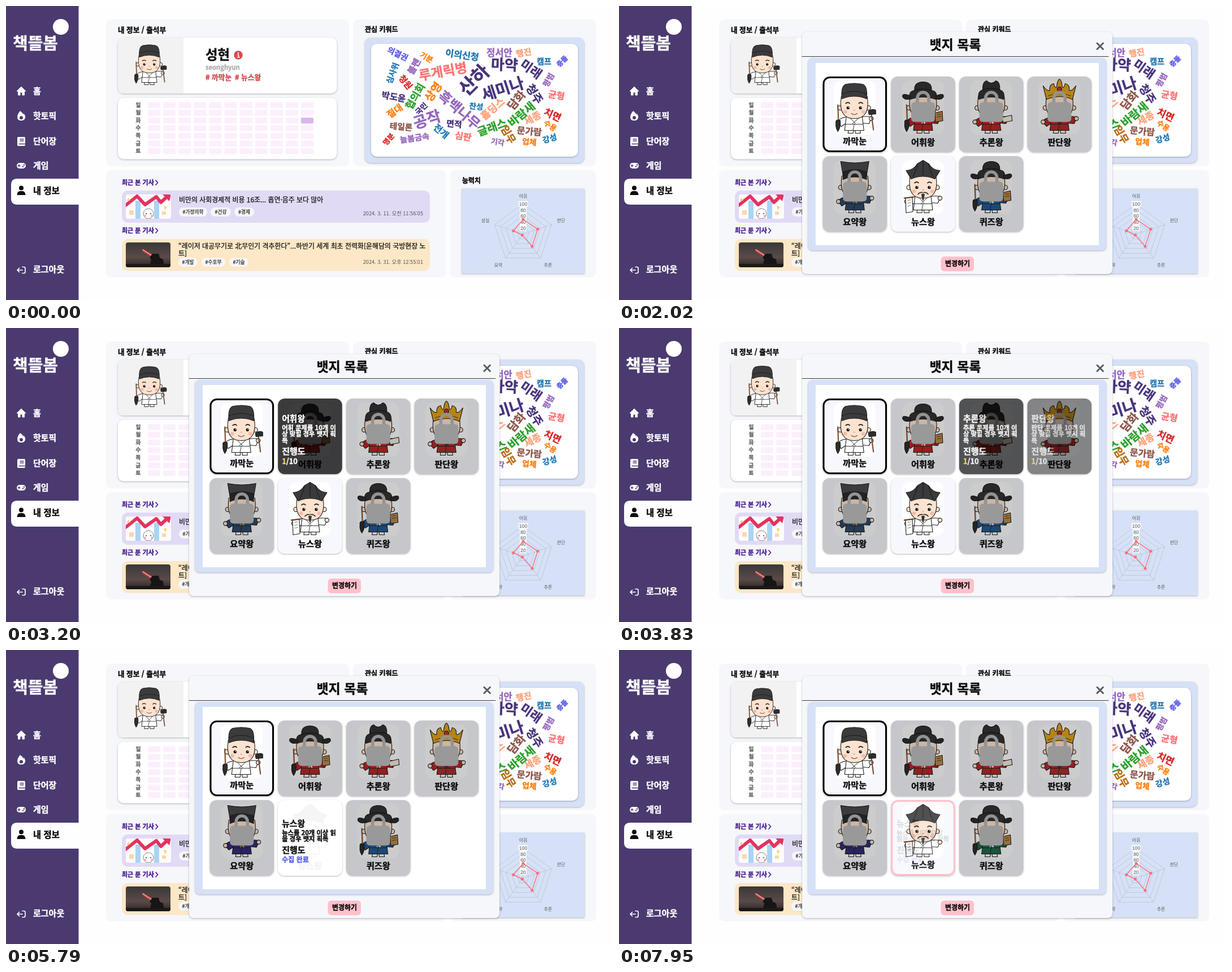
Animation of 1074 by 521 pixels, one loop 8000 ms. Source, as an HTML page:

```html
<!DOCTYPE html>
<html lang="ko">
<head>
<meta charset="utf-8">
<style>
html, body { margin: 0; width: 100%; height: 100%; overflow: hidden; background: #fefefe; }
svg { display: block; width: 1074px; height: 521px; }
text { font-family: "Noto Sans CJK KR", "Noto Sans CJK", "Noto Sans", sans-serif; font-weight: 900; stroke-width: .4px; white-space: pre; }
.mid { font-weight: 500; stroke-width: .25px; }
.thin { font-weight: 400; stroke-width: 0; }
.num { font-family: "Liberation Sans", sans-serif; font-weight: 400; stroke-width: 0; }
.sh { filter: drop-shadow(0 1px 1.5px rgba(0,0,0,.28)); }
</style>
</head>
<body>
<svg id="stage" viewBox="0 0 1074 521" xmlns="http://www.w3.org/2000/svg"></svg>
<script>
const LOOP = 8000, FADE = 300, OPEN = 1900, PICK = 7100;
const PANEL = '#f6f7fb', BLUE = '#d6e1f7', PINK = '#ffc0cb';

// --- drawing helpers ---
const text = (x, y, size, str, fill = '#0c0c0c', extra = '') =>
  `<text x="${x}" y="${(y + size * .36).toFixed(1)}" font-size="${size}" fill="${fill}" stroke="${fill}" ${extra}>${str}</text>`;
const mid = 'text-anchor="middle"';
const rect = (x, y, x2, y2, r, fill, extra = '') =>
  `<rect x="${x}" y="${y}" width="${x2 - x}" height="${y2 - y}" rx="${r}" fill="${fill}" ${extra}/>`;
const path = (d, fill = 'none', extra = '') => `<path d="${d}" fill="${fill}" ${extra}/>`;
const dot = (x, y, r, fill, extra = '') => `<circle cx="${x}" cy="${y}" r="${r}" fill="${fill}" ${extra}/>`;
const group = (x, y, body, extra = '') => `<g transform="translate(${x} ${y})" ${extra}>${body}</g>`;
const line = (d, color, w = 1, extra = '') => path(d, 'none', `stroke="${color}" stroke-width="${w}" stroke-linecap="round" stroke-linejoin="round" ${extra}`);

// --- scholars, hat top at y 0, feet at y 88 ---
const INK = 'stroke="#1c1c1c" stroke-width="1.1" stroke-linejoin="round"';
const hats = {
  cap: path('M-22 27 Q-24 3 -14 1 Q0 -2 14 1 Q24 3 22 27 Q0 18 -22 27z', '#3b3b3d', INK) + line('M-21 18 Q0 9 21 18', '#1c1c1c'),
  wing: path('M-23 28 Q-27 14 -15 12 Q-16 -3 0 -3 Q16 -3 15 12 Q27 14 23 28 Q0 20 -23 28z', '#333335', INK) +
    path('M-22 22 Q-38 15 -36 24 Q-32 30 -22 27zM22 22 Q38 15 36 24 Q32 30 22 27z', '#2c2c2e', INK) + line('M-15 12 Q0 7 15 12', '#111'),
  peak: path('M-22 28 Q-25 14 -15 11 Q-16 -3 -8 -5 Q0 3 8 -5 Q16 -3 15 11 Q25 14 22 28 Q0 20 -22 28z', '#333335', INK) + line('M-15 11 Q0 6 15 11', '#111'),
  crown: path('M-23 28 L-29 4 Q-22 14 -17 12 Q-19 2 -10 0 Q-8 9 -5 6 Q-4 -6 0 -8 Q4 -6 5 6 Q8 9 10 0 Q19 2 17 12 Q22 14 29 4 L23 28 Q0 18 -23 28z', '#e3a51c', INK) +
    dot(0, 10, 4, '#c93232', INK) + line('M-20 22 Q0 13 20 22', '#8a5a08', 1.5),
  tall: path('M-20 27 L-25 -3 Q0 2 25 -3 L20 27 Q0 19 -20 27z', '#4a4a4e', INK) + path('M-21 29 L-20 15 Q0 8 20 15 L21 29 Q0 20 -21 29z', '#2c2c30', INK),
  horn: path('M-21 28 L-30 13 Q-17 13 -10 1 L0 -5 L10 1 Q17 13 30 13 L21 28 Q0 19 -21 28z', '#3a3a3c', INK) + line('M0 -5 L0 21 M-10 1 Q-12 14 -18 24 M10 1 Q12 14 18 24', '#161616')
};
const props = {
  brush: line('M-29 38 L-28 66', '#8d5a3a', 2.4) + path('M-31 65 L-25 65 Q-23 76 -29 85 Q-35 76 -31 65z', '#2d2d30', INK),
  tool: line('M30 52 L34 82', '#7a5140', 2.2) + path('M25 49 Q31 44 38 47 L38 54 L26 55z', '#2d2d30', INK),
  book: path('M21 52 L34 49 L35 66 L22 68z', '#b98a4e', INK) + line('M25 55 L31 54 M25 59 L32 58', '#5a3a16'),
  note: path('M19 60 L36 56 L37 66 L21 69z', '#f3ecd9', INK),
  scroll: path('M-31 62 L-19 60 L-18 86 L-30 88z', '#fff', INK) + line('M-27 66 L-22 65 M-27 71 L-22 70 M-27 76 L-22 75', '#777') + line('M-33 62 L-17 60', '#6b4528', 2.4)
};
function scholar({ robe, hat, hold = [], beard, trim = '#fff', id = '' }) {
  const skin = '#fde3cf';
  return `<g>` +
    path('M-10 80 L-11 88 L-2 88 L-1 80zM10 80 L11 88 L2 88 L1 80z', '#f5f5f5', INK) +
    `<g ${id && `id="${id}"`} fill="${robe}">` +
    `<path d="M-13 59 Q-27 61 -30 68 L-23 76 L-14 70z M13 59 Q27 57 31 60 L26 71 L14 70z" ${INK}/>` +
    `<path d="M-14 58 L14 58 L17 83 L-17 83z" ${INK}/></g>` +
    line('M-7 60 L3 70 M8 60 L-2 70', trim, 2.5) + line('M-8 60 L2 71 M9 60 L-4 72 M-15 72 L15 72 M0 72 L-2 82', '#222', .9) +
    dot(-29, 68, 3.6, skin, INK) + dot(30, 62, 3.6, skin, INK) + hold.map(k => props[k]).join('') +
    dot(-25, 43, 4, skin, INK) + dot(25, 43, 4, skin, INK) +
    path('M-23 23 Q-29 62 0 62 Q29 62 23 23 Q0 12 -23 23z', skin, INK) + hats[hat] +
    dot(-11, 43, 2.7, '#171717') + dot(11, 43, 2.7, '#171717') + dot(-10, 42, .8, '#fff') + dot(12, 42, .8, '#fff') +
    line('M-15 35 Q-11 32 -8 35 M8 35 Q11 32 15 35', '#222', 1.7) +
    dot(-16, 50, 3.3, '#f9b9a6') + dot(16, 50, 3.3, '#f9b9a6') +
    line('M-1 47 Q0 48.500 1 47', '#a66') + (beard
      ? path('M-3 55 Q0 53 3 55 L1 66 L-1 66z', '#333') + line('M-1 52 Q-6 51 -9 55 M1 52 Q6 51 9 55', '#333', 1.7)
      : line('M-5 53 Q0 57 5 53', '#7b3a2d', 1.2)) + `</g>`;
}
const novice = scholar({ robe: '#fff', hat: 'cap', hold: ['brush', 'tool'] });

// --- sidebar ---
function sidebar() {
  const icon = (y, body) => group(27, y, body);
  const W = '#fff', B = '#4a3a70';
  const items = [[151, '홈'], [195, '핫토픽'], [240, '단어장'], [283, '게임'], [467, '로그아웃']];
  return rect(0, 0, 128.5, 521, 0, B) + path('M129 306 H20 Q9 306 9 317 V341 Q9 352 20 352 H129z', '#fefefe') +
    dot(97, 37, 14, W) + text(12, 67, 29, '책뜰봄', W) +
    items.map(([y, s]) => text(48, y, 15, s, W)).join('') + text(48, 327, 15.4, '내 정보') +
    icon(151, path('M0 -8 L8 0 H5.500 V7 H2 V2 H-2 V7 H-5.500 V0 H-8z', W, 'stroke="#fff" stroke-linejoin="round"')) +
    icon(195, path('M-2 -9 Q4 -5 3 -2 Q4 -3 4 -5 Q8 0 7 3 Q6 8 0 8 Q-7 8 -7 2 Q-7 -3 -2 -9z', W) + dot(0, 3, 3, B)) +
    icon(240, rect(-7, -8, 7, 8, 2, W) + line('M-4 4.500 H7 M-2 -4 H4 M-2 -1 H4', B, 1.4)) +
    icon(283, rect(-8, -5, 8, 5, 5, W) + line('M-6 0 H-2 M-4 -2 V2', B, 1.3) + dot(3, 1.5, 1.2, B) + dot(5, -1.5, 1.2, B)) +
    icon(327, dot(0, -4.5, 4, '#0c0c0c') + path('M-7.500 8 Q-7 1 -2 1 H2 Q7 1 7.500 8z', '#0c0c0c')) +
    icon(468, line('M2 -5.500 H4.500 Q7 -5.500 7 -3 V3 Q7 5.500 4.500 5.500 H2 M2 0 H-7 M-3.500 -3.500 L-7 0 L-3.500 3.500', W, 1.7));
}

// --- profile and attendance ---
function profile() {
  let s = rect(177, 24, 607, 284, 9, PANEL) + text(198, 42, 12.6, '내 정보 / 출석부') +
    rect(198, 56, 585.5, 155, 10, '#fff', 'class="sh"') + path('M314 56 H208 Q198 56 198 66 V145 Q198 155 208 155 H314z', '#f2f2f2') +
    `<g id="avatar">${novice}</g>` + text(353, 87, 23.4, '성현') +
    dot(411, 87, 7.7, '#d64a4c') + dot(411, 83.5, 1.3, '#fff') + line('M410 86.500 H411.500 V90.500 M409.500 90.800 H413', '#fff', 1.6) +
    text(353, 108.5, 11.2, 'seonghyun', '#adadad') +
    text(353, 126, 12.7, '# 까막눈', '#d4474c') + text(405, 126, 12.7, '# 뉴스왕', '#d4474c') +
    rect(198, 162.5, 585.5, 271.5, 10, '#fff', 'class="sh"');
  [...'일월화수목금토'].forEach((day, r) => {
    const y = 170.5 + r * 13.6;
    s += text(234, y + 4.5, 9.6, day, '#6a6a6a', mid);
    for (let c = 0; c < 11; c++) {
      const x = 251 + c * 27.1;
      s += rect(x, y, x + 22, y + 10.5, 2, r == 2 && c == 10 ? '#dab6ec' : '#fceffd');
    }
  });
  return s;
}

// --- word cloud: "word x y size angle" per colour ---
const cloud = (color, list) => list.split(',').map(w => {
  const [str, x, y, size, a] = w.trim().split(' ');
  return group(x, y, text(0, 0, +size, str, color, `${mid} transform="rotate(${a})"`));
}).join('');
function keywords() {
  return rect(614, 24, 1044, 284, 9, PANEL) + text(635, 42, 12, '관심 키워드') +
    rect(635, 56, 1023, 278, 10, BLUE, 'class="sh"') + rect(646, 67, 1012, 267, 10, '#fff', 'class="sh"') +
    cloud('#47337c', '산하 828 131 33 -45, 마약 882 104 26 2, 미래 929 112 22 35, 세미나 879 147 28 -18, 청주 935 156 20 58, 박도윤 686 161 15.6 10, 국민 735 182 13 -45, 면적 793 209 15 5') +
    cloud('#9467bd', '정서안 873 83 16.5 0, 볼펜 722 107 16 -60, 흑백나무 802 184 24 41, 공작 745 201 27 -18, 평범 960 131 14 -60, 늘봄금속 723 234 14.2 -8, 기각 870 241 13 8') +
    cloud('#1f77b4', '이의신청 807 87 16.2 8, 캠프 952 98 14 0, 심사위 684 119 14 -70, 찬성 832 178 13.5 5, 전개 770 222 16 40, 강성 962 235 14 -15') +
    cloud('#ff7f0e', '기분 744 91 13 30, 상영 756 152 20 -55, 절대 688 186 16 -35, 수용 963 212 13 35, 업체 926 241 14 5') +
    cloud('#ff7373', '루게릭병 773 116 23.5 -10, 균형 974 158 16 10, 심판 809 231 16 10') +
    cloud('#ffa07a', '행진 916 83 15 -10, 홀딩스 861 182 18 -40, 세종 932 199 17 -30') +
    cloud('#2ca02c', '협의회 724 160 18 -60, 바람새 912 192 20 -40, 글래스 860 215 19.5 -20') +
    cloud('#d62728', '청원 707 135 15 50, 치면 967 193 17 25, 명분 677 236 12.5 -50') +
    cloud('#8c564b', '담화 903 167 20 -50, 테일론 699 214 14.5 5, 문가람 926 222 16 5') +
    cloud('#5b5bea', '의결권 693 85 14 25, 충돌 984 98 12 -45') + cloud('#b8690f', '임무 889 228 18 60');
}

// --- recent articles ---
function articles() {
  const head = (y, s) => text(205, y, 11, s, '#4b2090') + line(`M265 ${y - 4} L268.500 ${y} L265 ${y + 4}`, '#4b2090', 1.7);
  const tag = (x, y, w, s) => rect(x, y, x + w, y + 16, 8, '#f7f6f9') + text(x + w / 2, y + 8, 8.7, s, '#333', `${mid} class="mid"`);
  const date = (y, s) => text(738, y, 9.2, s, '#555', 'text-anchor="end" class="thin"');
  const title = (x, y, s) => text(x, y, 11.95, s, '#111', 'class="mid"');
  return rect(177, 291, 778, 481, 9, PANEL) + head(313, '최근 본 기사') + head(398, '최근 푼 기사') +
    rect(205, 327, 750, 384, 10, '#e1daf5') + rect(205, 413, 750, 469.500, 10, '#fce7c6') +
    `<clipPath id="thumbs">${rect(212, 334, 292, 377, 4)}${rect(212, 419, 291, 463, 4)}</clipPath><g clip-path="url(#thumbs)">` +
    rect(212, 334, 292, 377, 0, '#fdfbfd') + rect(229, 345, 238, 377, 0, '#a9d4f4') + rect(262, 345, 271, 377, 0, '#a9d4f4') +
    line('M212 353 L232 337 L246 352 L266 338 L274 348 L288 335', '#e5325f', 6) + path('M277 334 L292 334 L289 346z', '#e5325f') +
    path('M213 345 l4 -5 l3 5zM279 354 l6 2 l-4 6z', '#f7d37c') + path('M218 362 h8 v8 h-8zM276 364 h7 v6 h-7z', '#f9d9a8') +
    dot(252, 368, 9, '#fff', 'stroke="#666" stroke-width=".8"') + dot(248, 368, 1, '#333') + dot(256, 368, 1, '#333') + dot(246, 372, 2, '#f7a8b4') + dot(258, 372, 2, '#f7a8b4') +
    rect(212, 419, 291, 463, 0, 'url(#dusk)') + line('M244 434 L262 445', '#ff3a3a', 5, 'opacity=".45"') + line('M242 432 L262 445', '#ff8f86', 2) +
    path('M254 463 L257 449 L254 446 L259 439 L270 439 L272 446 L278 449 L280 463z', '#171515') + rect(212, 457, 291, 463, 0, '#1c1818') + '</g>' +
    title(306, 344, '비만의 사회경제적 비용 16조... 흡연·음주 보다 많아') +
    tag(306, 357, 50, '#가정의학') + tag(362, 357, 36, '#건강') + tag(404, 357, 35, '#경제') + date(368, '2024. 3. 11. 오전 11:56:05') +
    title(305, 426, '“레이저 대공무기로 北무인기 격추한다”...하반기 세계 최초 전력화[윤해담의 국방현장 노') + title(305, 439, '트]') +
    tag(305, 446, 34, '#개발') + tag(346, 446, 42, '#수호부') + tag(395, 446, 34, '#기술') + date(454, '2024. 3. 31. 오후 12:55:01');
}

// --- radar chart ---
function radar() {
  const at = (i, v) => [915 + 53 * v * Math.sin(i * Math.PI * .4), 404 - 53 * v * Math.cos(i * Math.PI * .4)].map(n => n.toFixed(1));
  const poly = (vals, color, w) => line('M' + vals.map((v, i) => at(i, v).join(' ')).join('L') + 'z', color, w);
  const values = [.49, .51, .51, .05, .34];
  let s = rect(786, 291, 1044, 481, 9, PANEL) + text(807, 310, 12, '능력치') + rect(806.5, 323.5, 1023.5, 474, 1, BLUE, 'class="sh"');
  for (let k = 1; k < 6; k++) s += poly(Array(5).fill(k / 5), '#b9c2d3', .8);
  for (let i = 0; i < 5; i++) s += line(`M915 404 L${at(i, 1).join(' ')}`, '#b9c2d3', .8);
  for (let k = 1; k < 6; k++) {
    const y = 404 - k * 10.6, w = k == 5 ? 8.5 : 6;
    s += rect(915 - w, y - 5.3, 915 + w, y + 5.3, 0, '#fff', 'opacity=".8"') + text(915, y, 8.6, k * 20, '#5c5c5c', `${mid} class="num"`);
  }
  s += poly(values, '#ff6b74', 1.4) + values.map((v, i) => dot(...at(i, v), 2.5, '#ff6b74')).join('');
  [['어휘', 915, 337], ['판단', 982, 380], ['추론', 959, 459], ['요약', 871, 459], ['성실', 848, 380]].forEach(([n, x, y]) => {
    s += text(x, y, 8, n, '#5c5c5c', `${mid} class="thin"`);
  });
  return s;
}

// --- badges: spans are the hover times ---
const quiz = n => [`${n} 문제를 10개 이`, '상 맞힐 경우 뱃지 획', '득'];
const badges = [
  { name: '까막눈', open: 1, robe: '#fff', hat: 'cap', hold: ['brush', 'tool'], desc: ['회원가입 시 주어지', '는 뱃지입니다.'], spans: [[2220, 2700]] },
  { name: '어휘왕', robe: '#c22326', hat: 'wing', hold: ['brush', 'book'], desc: quiz('어휘'), done: 1, of: 10, spans: [[2720, 3200]] },
  { name: '추론왕', robe: '#c22326', hat: 'peak', hold: ['note'], desc: quiz('추론'), done: 1, of: 10, spans: [[3220, 3790]] },
  { name: '판단왕', robe: '#b52a2c', hat: 'crown', trim: '#26386e', desc: quiz('판단'), done: 1, of: 10, spans: [[3746, 4250]] },
  { name: '요약왕', robe: '#2d4a6c', later: '#332c7a', turn: 5450, hat: 'tall', trim: '#c9a55a', desc: ['요약까지 완료한 뉴스', '갯수가 10개 이상일', '경우 뱃지 획득'], done: 2, of: 10, spans: [[4330, 5450]] },
  { name: '뉴스왕', open: 1, robe: '#fff', hat: 'horn', beard: 1, hold: ['scroll'], desc: ['뉴스를 20개 이상 읽', '을 경우 뱃지 획득'], spans: [[5480, 6050], [6660, 7770]] },
  { name: '퀴즈왕', robe: '#235a93', later: '#1d6a4c', turn: 6900, hat: 'wing', hold: ['brush', 'book'], desc: ['단어 게임에서 단어를', '20개 이상 맞힐 경우', '뱃지 획득'], done: 0, of: 20, spans: [[6070, 6660]] }
];
const CW = 113.5, CH = 134;
function tip(b, x, desc, id) {
  const ink = b.open ? '#111' : '#fff', n = desc.length, y = n > 2 ? 36 : 42;
  const end = y + 16 + 11.2 * n;
  return `<g id="${id}">` + text(x, y, 14.8, b.name, ink) +
    desc.map((d, i) => text(x, y + 16 + i * 11.2, 11.3, d, ink)).join('') +
    text(x, end + 8, 15, '진행도', ink) + (b.open
      ? text(x, end + 25.5, 12, '수집 완료', '#5a62f0')
      : text(x, end + 26, 12.8, `<tspan fill="#f8d24a" stroke="#f8d24a">${b.done}</tspan>/${b.of}`, ink)) + '</g>';
}
function badge(b, i) {
  const first = i == 0, news = i == 5, c = CW / 2;
  let s = rect(0, 0, CW, CH, 12, '#f7f8fd', 'class="sh"') + rect(c - 37, 7, c + 37, 103, 14, '#fff') +
    group(c - (first ? 1 : 0), 12.5, scholar({ ...b, id: 'robe' + i }));
  if (!b.open) s += rect(0, 0, CW, CH, 12, '#000', 'opacity=".2"') +
    line(`M${c - 10} 48 V38 A10 10 0 0 1 ${c + 10} 38 V48`, '#939393', 5.5) + rect(c - 21, 45.5, c + 21, 80.5, 6, '#999');
  s += `<g id="name${i}">${text(c, first ? 114 : 116, 15.2, b.name, '#0c0c0c', mid)}</g>`;
  s += `<g id="over${i}">` + rect(0, 0, CW, CH, 12, b.open ? '#fff' : '#000', `opacity="${b.open ? .95 : .7}"`) +
    tip(b, first ? 10 : 7, b.desc, 'tip' + i) + (news ? tip(b, 10, ['뉴스를 20개 이상', '읽을 경우 뱃지 획득'], 'picked') : '') + '</g>';
  const edge = color => `<rect x="1.5" y="1.5" width="${CW - 3}" height="${CH - 3}" rx="11" fill="none" stroke="${color}" stroke-width="3" ${news ? 'id="edge"' : ''}/>`;
  if (first) s += edge('#000');
  if (news) s += edge(PINK);
  return group(360.5 + (i % 4) * 120.7, i < 4 ? 125 : 266, s);
}
const modal = () => `<g id="modal">` + rect(324, 46, 873, 475, 8, PANEL, 'class="sh"') +
  text(595, 69, 23, '뱃지 목록', '#0c0c0c', mid) + line('M324 89.500 H866', '#3a3a3a') +
  line('M846 66 L856.500 76.500 M856.500 66 L846 76.500', '#5c5c5c', 3) +
  rect(334.5, 92, 862, 433, 8, BLUE, 'class="sh"') + rect(348, 101, 849, 424, 0, '#fff') +
  badges.map(badge).join('') + rect(569.5, 444, 628, 470, 6, PINK) + text(599, 457, 12, '변경하기', '#0c0c0c', mid) + '</g>';

const stage = document.getElementById('stage');
stage.innerHTML = '<defs><linearGradient id="dusk" x2="0" y2="1"><stop stop-color="#3a3838"/><stop offset=".6" stop-color="#5a4a48"/><stop offset="1" stop-color="#2a2424"/></linearGradient></defs>' +
  sidebar() + profile() + keywords() + articles() + radar() + modal();

// --- motion ---
const el = id => document.getElementById(id);
const show = (id, on) => el(id).setAttribute('display', on ? 'inline' : 'none');
function ease(x) {
  if (x <= 0) return 0;
  if (x >= 1) return 1;
  const bez = (a, b, u) => 3 * a * u * (1 - u) ** 2 + 3 * b * u * u * (1 - u) + u ** 3;
  let lo = 0, hi = 1;
  for (let i = 0; i < 18; i++) {
    const u = (lo + hi) / 2;
    if (bez(.25, .25, u) < x) lo = u; else hi = u;
  }
  return bez(.1, 1, lo);
}
const hover = (t, spans) => Math.max(...spans.map(([a, b]) => ease((t - a) / FADE) - ease((t - b) / FADE)));

function draw(t) {
  const lift = (1 - Math.cos(t / 1020 * Math.PI * 2)) / 2;
  el('avatar').setAttribute('transform', `translate(253.500 139.500) scale(.8 ${(.8 + lift * .032).toFixed(4)}) translate(0 -88)`);
  show('modal', t >= OPEN);
  badges.forEach((b, i) => {
    el('over' + i).setAttribute('opacity', hover(t, b.spans).toFixed(3));
    if (b.later) el('robe' + i).setAttribute('fill', t < b.turn ? b.robe : b.later);
  });
  const picked = t >= PICK;
  show('edge', picked);
  show('picked', picked);
  show('tip5', !picked);
  el('name5').setAttribute('transform', `translate(0 ${picked ? -2 : 0})`);
}
const start = performance.now();
function tick() {
  draw((performance.now() - start) % LOOP);
  requestAnimationFrame(tick);
}
tick();
</script>
</body>
</html>
```
